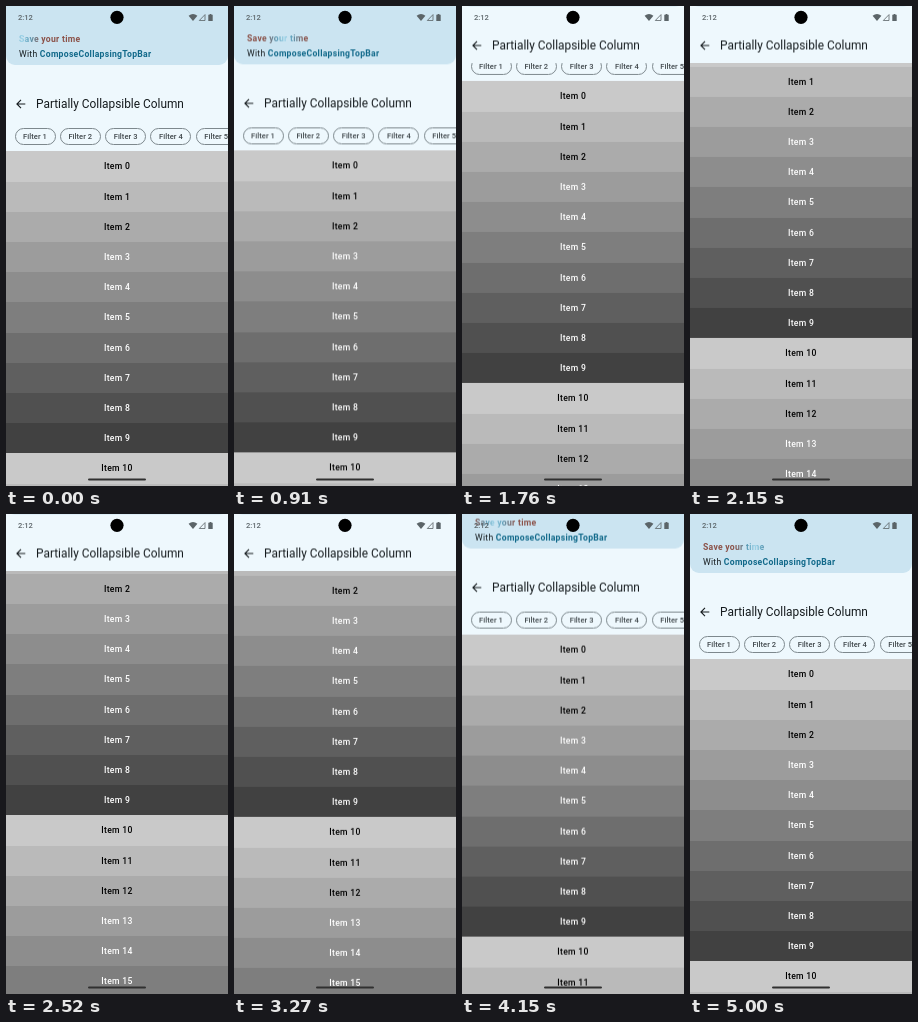
These frames come from a looping animation (222x480 px, 5030 ms). An HTML page:

```html
<!DOCTYPE html>
<html lang="en">
<head>
<meta charset="utf-8">
<title>Collapsing top bar</title>
<style>
html, body { margin: 0; width: 100%; height: 100%; overflow: hidden; }
body { background: #eef8fd; font-family: Roboto, sans-serif; color: #151b1e; }
#stage { position: absolute; left: 0; top: 0; width: 222px; height: 480px; overflow: hidden; background: #eef8fd; }
#stage div, #stage span.line, svg { position: absolute; white-space: nowrap; }
#body, #head { left: 0; top: 0; width: 222px; will-change: transform; }
.item { left: 0; width: 222px; height: 30.3px; line-height: 30.2px; text-align: center;
  font-size: 8.64px; font-weight: 500; letter-spacing: .27px; }
.chip { top: 121.6px; width: 41px; height: 17.2px; box-sizing: border-box; border: 1px solid #7d888d; border-radius: 9px;
  line-height: 15.4px; text-align: center; font-size: 7.56px; font-weight: 500; letter-spacing: .05px; color: #40484c; }
#bar { left: 0; top: 0; width: 222px; height: 115.2px; background: #eef8fd; }
#title { left: 30px; top: 90px; line-height: 16px; font-size: 11.88px; }
#banner { left: 0; top: 0; width: 222px; height: 58.5px; background: #cbe4f1; border-radius: 0 0 9px 9px; }
.line { left: 13px; line-height: 13px; font-size: 8.64px; letter-spacing: .27px; }
.line b { color: #11698a; }
#shine { top: 26.5px; font-weight: 700; color: transparent; -webkit-background-clip: text; background-clip: text;
  background-image: linear-gradient(90deg, #8b5148 0, #8b5148 50px, #5b9db8 63px, #9fd5ea 70.5px, #5b9db8 78px, #8b5148 91px, #8b5148 141px);
  background-size: 141px 100%; }
#clock { left: 12px; top: 6px; line-height: 11px; font-size: 7.56px; font-weight: 500; color: #5b6468; }
</style>
</head>
<body>
<div id="stage">
  <div id="body"></div>
  <div id="head">
    <div id="bar"></div>
    <svg width="24" height="20" style="left:0;top:88px" fill="none" stroke="#151b1e" stroke-width="1.1">
      <path d="M19.3 10H11.4M15 5.9L10.9 10L15 14.1"/>
    </svg>
    <div id="title">Partially Collapsible Column</div>
    <div id="banner"></div>
    <span class="line" id="shine">Save your time</span>
    <span class="line" style="top:41.5px">With <b>ComposeCollapsingTopBar</b></span>
  </div>
  <div id="clock">2:12</div>
  <svg width="222" height="480" style="left:0;top:0">
    <circle cx="111" cy="11.3" r="6.6" fill="#000"/>
    <g fill="#5b6468">
      <path d="M182.6 9.7Q187 6.4 191.4 9.7L187 15Z"/>
      <path d="M193.3 14.5L199 8.6V14.5Z" fill="none" stroke="#5b6468" stroke-width=".8"/>
      <path d="M202.3 8.8H203.6V8H205.4V8.8H206.7V15H202.3Z"/>
    </g>
    <rect x="82" y="472.4" width="58" height="2.2" rx="1.1" fill="#303030"/>
  </svg>
</div>
<script>
const $ = id => document.getElementById(id);
const LOOP = 5030, ROW = 30.2, LIST_TOP = 145.3, BANNER = 58.5;

function add(cls, text, style) {
  const el = document.createElement('div');
  el.className = cls;
  el.textContent = text;
  Object.assign(el.style, style);
  $('body').append(el);
}

for (let i = 0; i < 5; i++) add('chip', 'Filter ' + (i + 1), { left: 8.5 + i * 45.3 + 'px' });
for (let i = 0; i < 17; i++) {
  const k = i % 10, g = Math.round(201 - 15.1 * k);
  add('item', 'Item ' + i, {
    top: LIST_TOP + i * ROW + 'px',
    background: `rgb(${g},${g},${g})`,
    color: k < 3 ? '#000' : '#fff'
  });
}

// Scroll distance over time: [ms, px]
const steps = [[0, 0], [850, 0], [1360, 28], [2150, 115], [2520, 146],
  [3220, 146], [3270, 144.2], [3790, 78], [4150, 24.5], [4560, 0], [LOOP, 0]];
const slope = i => (steps[i + 1][1] - steps[i][1]) / (steps[i + 1][0] - steps[i][0]);
const tangent = steps.map((_, i) => {
  if (i === 0 || i === steps.length - 1) return 0;
  const a = slope(i - 1), b = slope(i);
  return a * b > 0 ? 2 * a * b / (a + b) : 0;
});

// Monotone cubic through the steps
function scrollAt(t) {
  let i = 0;
  while (i < steps.length - 2 && t >= steps[i + 1][0]) i++;
  const [t0, y0] = steps[i], [t1, y1] = steps[i + 1];
  const h = t1 - t0, u = (t - t0) / h, v = 1 - u;
  return y0 * v * v * (1 + 2 * u) + y1 * u * u * (3 - 2 * u)
    + h * u * v * (tangent[i] * v - tangent[i + 1] * u);
}

function draw(now) {
  const t = now % LOOP, y = scrollAt(t);
  $('body').style.transform = `translateY(${-y}px)`;
  $('head').style.transform = `translateY(${-Math.min(y, BANNER)}px)`;
  $('shine').style.backgroundPositionX = 16 + 0.038 * t - 13 - 70.5 + 'px';
  requestAnimationFrame(() => draw(performance.now() - start));
}
const start = performance.now();
draw(0);
</script>
</body>
</html>
```
